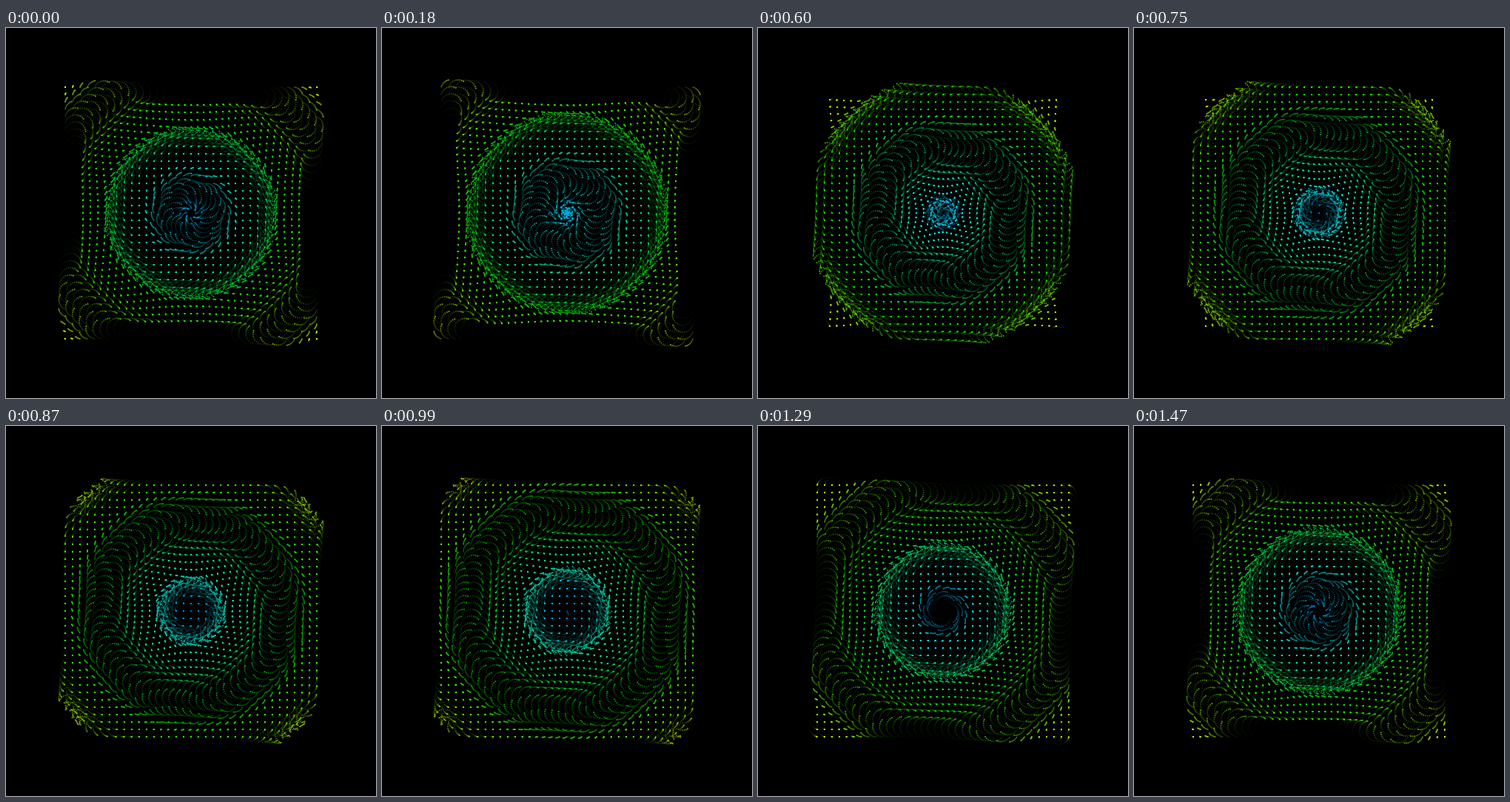
An HTML page with a canvas for the animation above (1.5 s loop, 500 by 500 pixels).

```html
<!DOCTYPE html>
<html lang="en">
<head>
<meta charset="utf-8">
<title>Swirling grid</title>
<style>
  html, body { margin: 0; width: 100%; height: 100%; overflow: hidden; background: #000; }
  canvas { display: block; width: 500px; height: 500px; }
</style>
</head>
<body>
<canvas id="stage" width="500" height="500"></canvas>
<script>
const ctx = document.getElementById('stage').getContext('2d');
const TAU = Math.PI * 2;
const STEP = 30, STEPS = 50;       // 1500 ms loop
const GAP = 10, HALF = 17;         // 35 x 35 dots
const REACH = 12;                  // half the inward travel
const SWING = TAU / 3;             // half angle of each arc
const RADIUS = REACH / Math.sin(SWING);
const WAVE = 171, FRONT = 125;     // wavelength, ring radius at time zero
const TRAIL = 22, LAG = 0.5;

const trail = Array.from({ length: TRAIL }, (_, k) => ({
  lag: k * LAG,
  alpha: 0.65 * 0.86 ** k,
  size: 1.8 - 0.9 * k / TRAIL
}));

const dots = [];
for (let j = -HALF; j <= HALF; j++) {
  for (let i = -HALF; i <= HALF; i++) {
    const x = i * GAP, y = j * GAP, r = Math.hypot(x, y);
    dots.push({
      x: 250 + x,
      y: 250 + y,
      ux: r ? x / r : 1,
      uy: r ? y / r : 0,
      phase: -(r - FRONT) / WAVE,
      glow: Math.min(1, 0.6 + r / 100),
      color: `hsl(${208 - 0.58 * r}, 100%, 50%)`
    });
  }
}

// Each dot swings in and out along one arc, resting at both ends.
function drawDot(d, n) {
  ctx.fillStyle = d.color;
  for (let k = TRAIL - 1; k >= 0; k--) {
    const { lag, alpha, size } = trail[k];
    const u = TAU * ((n - lag) / STEPS + d.phase);
    const a = SWING * Math.sin(Math.PI / 2 * Math.sin(u));
    const out = RADIUS * Math.sin(a) - REACH;
    const side = RADIUS * (Math.cos(a) - Math.cos(SWING));
    const x = d.x + d.ux * out - d.uy * side;
    const y = d.y + d.uy * out + d.ux * side;
    ctx.globalAlpha = alpha * d.glow;
    ctx.fillRect(x - size / 2, y - size / 2, size, size);
  }
}

function draw(n) {
  ctx.globalAlpha = 1;
  ctx.fillStyle = '#000';
  ctx.fillRect(0, 0, 500, 500);
  for (const d of dots) drawDot(d, n);
}

const start = performance.now();
let last = -1;
function tick() {
  const n = Math.floor((performance.now() - start) / STEP) % STEPS;
  if (n !== last) draw(last = n);
  requestAnimationFrame(tick);
}
tick();
</script>
</body>
</html>
```
